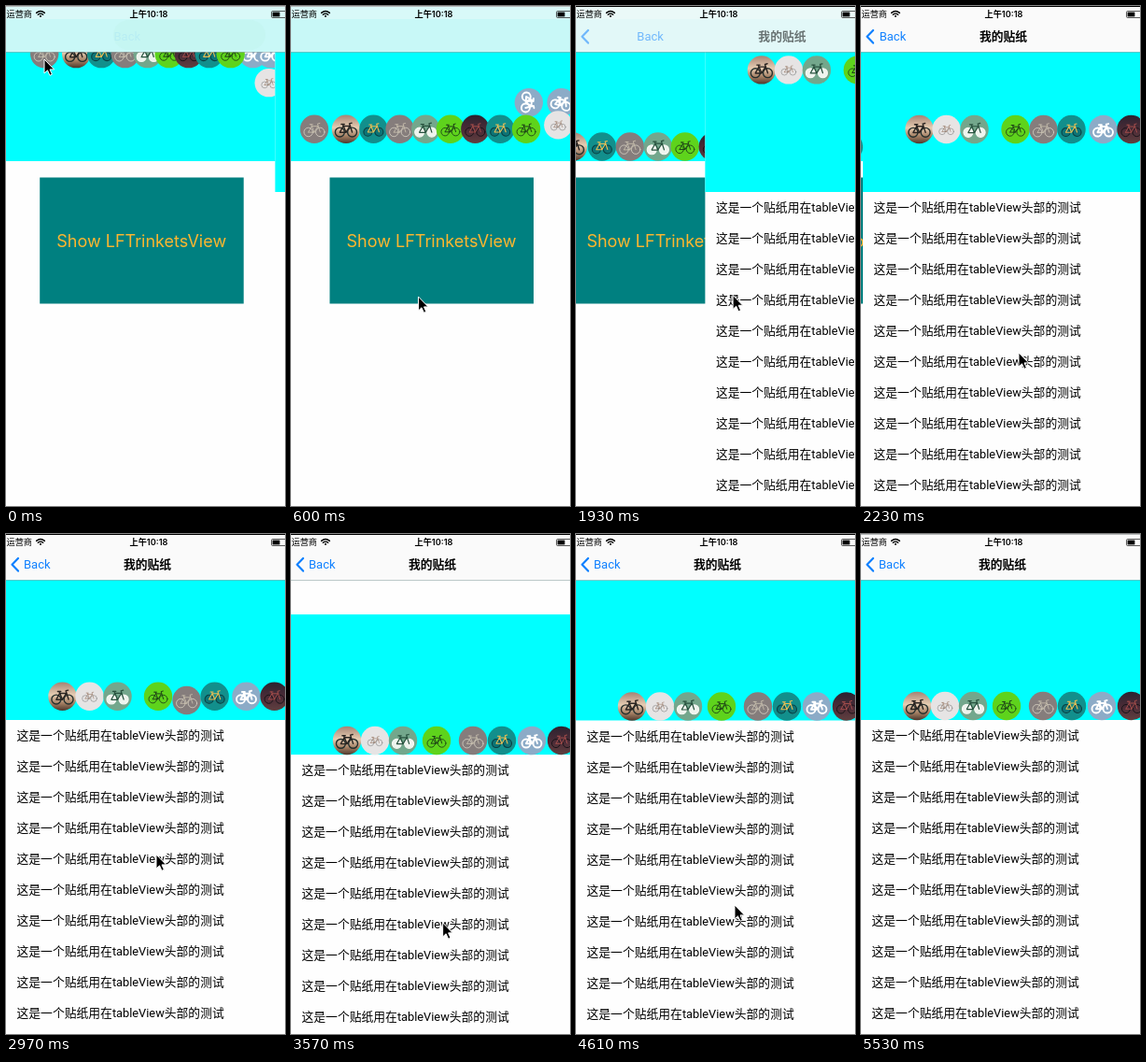
An HTML page that plays this animation: 299x535 px, repeating every 5.63 s.

```html
<!DOCTYPE html>
<html lang="zh-CN">
<head>
<meta charset="utf-8">
<title>我的贴纸</title>
<style>
  html, body { margin: 0; width: 100%; height: 100%; overflow: hidden; background: #fefefe; }
  svg { display: block; width: 100vw; height: 100vh; }
  text { font-family: Roboto, "Noto Sans CJK SC", "Noto Sans CJK", sans-serif; fill: #000; }
  .row { font-size: 12.8px; }
  .title { font-size: 12.8px; font-weight: 700; text-anchor: middle; }
  .back { font-size: 13px; fill: #0f80ff; }
  .show { font: 18px Inter, sans-serif; fill: #fdb62f; text-anchor: middle; }
  .carrier { font-size: 9.2px; }
  .clock { font: 600 9.2px Inter, "Noto Sans CJK SC", "Noto Sans CJK", sans-serif; text-anchor: middle; }
  .line { fill: none; stroke-linecap: round; stroke-linejoin: round; }
</style>
</head>
<body>
<svg viewBox="0 0 299 535" preserveAspectRatio="none">
  <defs>
    <linearGradient id="dusk" x2="0" y2="1">
      <stop offset="0" stop-color="#a58475"/><stop offset=".45" stop-color="#e6cdb2"/>
      <stop offset=".75" stop-color="#a17c60"/><stop offset="1" stop-color="#4b382d"/>
    </linearGradient>
    <linearGradient id="night" x2="0" y2="1">
      <stop offset="0" stop-color="#2b2330"/><stop offset=".55" stop-color="#4d2c37"/>
      <stop offset="1" stop-color="#5f4040"/>
    </linearGradient>
  </defs>
  <rect width="299" height="535" fill="#fefefe"/>

  <g id="home">
    <rect width="299" height="166" fill="#0ff"/>
    <g id="homeStickers"></g>
    <rect x="41.5" y="183.5" width="218.5" height="135" fill="#008080"/>
    <text class="show" x="150.5" y="257.5">Show LFTrinketsView</text>
  </g>

  <g id="list">
    <rect width="299" height="535" fill="#fefefe"/>
    <g id="table">
      <rect y="49" width="299" height="150" fill="#0ff"/>
      <g id="listStickers"></g>
      <g id="rows"></g>
    </g>
  </g>

  <rect width="299" height="49" fill="#d8f9f8"/>
  <rect y="14" width="299" height="35" fill="#c8f8f7"/>
  <rect id="glow" x="115" y="15" width="163" height="32" rx="16" fill="#bdf0e6"/>
  <rect id="plain" width="299" height="49" fill="#fafafa"/>
  <rect y="49" width="299" height=".6" fill="#8fa5a5"/>
  <path id="chevron" class="line" d="M13 26L6.5 32.8L13 39.6" stroke="#0f80ff" stroke-width="2.2"/>
  <text id="back" class="back" y="37.3">Back</text>
  <text id="title" class="title" y="37.3">我的贴纸</text>

  <text class="carrier" x=".5" y="12">运营商</text>
  <g class="line" stroke="#000" stroke-width="1.4">
    <path d="M32.6 7.4Q37 3.6 41.4 7.4M34.3 9.2Q37 7 39.7 9.2"/>
    <circle cx="37" cy="10.8" r=".4"/>
  </g>
  <text class="clock" x="153" y="12">上午10:18</text>
  <rect x="284.5" y="5.5" width="18" height="7" rx="1.2" fill="none" stroke="#333" stroke-width=".8"/>
  <rect x="285.6" y="6.6" width="7.8" height="4.8" fill="#000"/>
  <rect id="edge" width="299" height="1"/>
  <path id="cursor" d="M0 0V15L3.5 11.8L6 17.3L8.4 16.2L6 10.9H10.6Z" stroke="#fff" stroke-width="1"/>
</svg>
<script>
const LOOP = 5630, GRAVITY = 391, BOUNCE = .41;
const POP = -.43, PUSH = 1.64, PRESS = 3300, RELEASE = 4080, PRESS_Y = 343;
const $ = id => document.getElementById(id);
const clamp = v => Math.min(1, Math.max(0, v));
const ease = v => { v = clamp(v); return v * v * (3 - 2 * v); };
const mix = (a, b, v) => a + (b - a) * v;
const move = (el, x, y = 0, turn = 0) =>
  el.setAttribute('transform', `translate(${x.toFixed(2)} ${y.toFixed(2)}) rotate(${turn.toFixed(1)})`);

// fill, wheel colour, frame colour, line width, wheel fill, scale
const skins = {
  gray:  ['#857d7c', '#d5cfc2', '#c9c0ae', .8, 'none', 1.05],
  photo: ['url(#dusk)', '#24302e', '#2a2522', 1.3, 'none', 1.1],
  teal:  ['#128f8c', '#0a3f42', '#e6bd55', 1.1, '#0d7476', 1],
  sage:  ['#73a78c', '#f4f7f2', '#28523f', 1.1, '#eef4ee', 1.1],
  green: ['#5ed31c', '#204b18', '#1c3d17', 1, 'none', .95],
  dark:  ['url(#night)', '#191419', '#a14c4a', 1, 'none', 1],
  white: ['#e6e4e4', '#777', '#8d6a55', .7, 'none', .75],
  blue:  ['#8cabc7', '#fff', '#fff', 1.9, 'none', 1]
};

function sticker(parent, kind) {
  const [fill, wheel, frame, width, inside, size] = skins[kind];
  const g = document.createElementNS('http://www.w3.org/2000/svg', 'g');
  g.innerHTML = `<circle r="15.2" fill="${fill}"/>
    <g class="line" stroke-width="${width}" transform="scale(${size})">
      <g stroke="${wheel}" fill="${inside}"><circle cx="-6" cy="3" r="4.5"/><circle cx="6" cy="3" r="4.5"/></g>
      <path stroke="${frame}" d="M-6 3L-2.6 -3H3.8L0 3.2H-6M0 3.2L-3.2 -4.8M-4.6 -4.8H-1.6M6 3L3.3 -5.4L5.6 -6"/>
    </g>`;
  parent.append(g);
  return g;
}

// kind, first x, resting x, resting y, restitution, head start, final turn
const homeSet = [
  ['gray', 46.5, 11], ['photo', 80.5, 45], ['teal', 107.5, 76], ['gray', 133, 106],
  ['sage', 157, 136], ['green', 180, 165], ['dark', 201, 195], ['teal', 223, 225],
  ['blue', 270, 245, 121, BOUNCE, 0, 155], ['blue', 289, 290, 121, BOUNCE, 0, 20],
  ['green', 246, 256], ['white', 287, 286, 150, BOUNCE, .156]
];
const listSet = [
  ['photo', 60.5, 60], ['white', 89.5, 90], ['sage', 119.5, 120], ['green', 163.5, 156],
  ['gray', 193.5, 195, 184, .385], ['teal', 223.5, 226], ['blue', 257.5, 258], ['dark', 287.5, 290]
];
const build = (set, parent, floor) => set.map(
  ([kind, x0, x1, y = floor, bounce = BOUNCE, lead = 0, turn = 0]) =>
    ({ el: sticker(parent, kind), x0, x1, y, bounce, lead, turn }));
const homeStickers = build(homeSet, $('homeStickers'), 150.5);
const listStickers = build(listSet, $('listStickers'), 184);

$('rows').innerHTML = Array.from({ length: 11 }, (_, i) =>
  `<text class="row" x="11.5" y="${220.2 + 33 * i}">这是一个贴纸用在tableView头部的测试</text>`).join('');

// Height above the floor for a body dropped from h, with bounces
function height(s, h, bounce) {
  if (s < 0) return h;
  const fall = Math.sqrt(2 * h / GRAVITY);
  if (s < fall) return h - GRAVITY * s * s / 2;
  s -= fall;
  let v = GRAVITY * fall * bounce;
  for (let i = 0; i < 3; i++, v *= bounce) {
    const air = 2 * v / GRAVITY;
    if (s < air) return v * s - GRAVITY * s * s / 2;
    s -= air;
  }
  return 0;
}

function drop(set, s, top, slide) {
  for (const b of set)
    move(b.el, mix(b.x0, b.x1, slide), b.y - height(s + b.lead, b.y - top, b.bounce), b.turn * slide);
}

// Critically damped spring: share of the way still to go
const spring = x => x <= 0 ? 1 : (1 + x) * Math.exp(-x);

// Screen updates: [start, number of equal holds until the next start]
const holds = [[0, 1], [150, 6], [1050, 1], [1200, 1], [1350, 6], [2230, 1], [2370, 6],
  [3270, 1], [3420, 7], [4460, 1], [4610, 3], [5060, 1], [5530, 1], [LOOP, 1]];
function hold(t) {
  const i = holds.findIndex(h => h[0] > t) - 1;
  const [a, n] = holds[i], span = (holds[i + 1][0] - a) / n;
  return a + Math.floor((t - a) / span) * span;
}

const path = [[0, 41, 57], [250, 58, 110], [650, 140, 320], [900, 168, 370], [1150, 171, 364],
  [1350, 170, 337], [1560, 168, 300], [1660, 168, 300], [2230, 169, 371], [2970, 161, 343],
  [PRESS, 161, PRESS_Y], [4000, 166, 565], [4120, 167, 565], [4610, 170, 397], [5060, 172, 565], [LOOP, 172, 565]];
function pointer(t) {
  const i = path.findIndex(p => p[0] > t);
  const a = path[i - 1], b = path[i], v = ease((t - a[0]) / (b[0] - a[0]));
  return [mix(a[1], b[1], v), mix(a[2], b[2], v)];
}

function pull(t) {
  if (t < PRESS) return 0;
  const d = pointer(Math.min(t, RELEASE))[1] - PRESS_Y;
  const stretch = 486 * (1 - 1 / (d * .55 / 486 + 1));
  return stretch * spring((t - RELEASE) / 1000 * 14);
}

function draw(t) {
  const s = t / 1000, popping = t < 1400;
  const shown = popping ? spring(12 * (s - POP)) : 1 - spring(12 * (s - PUSH));
  const away = 1 - shown;

  move($('home'), -299 * shown * (popping ? .5 : .3) * 1);
  move($('list'), 299 * away);
  move($('table'), 0, pull(t));
  drop(homeStickers, s - POP, 15, ease(s / 1.05));
  drop(listStickers, s - PUSH, 64, ease((s - 2.9) / .45));

  $('plain').setAttribute('opacity', popping ? shown * .5 : shown);
  $('glow').setAttribute('opacity', popping ? clamp(shown * 16) * .6 : 0);
  $('chevron').setAttribute('opacity', popping ? 0 : shown);
  $('back').setAttribute('opacity', popping ? clamp(shown * 2) : shown);
  $('title').setAttribute('opacity', popping ? 0 : shown);
  move($('back'), 19 + 100 * away);
  move($('title'), 151.5 + 150 * away);
  $('edge').setAttribute('fill', t >= 1200 && t < 5530 ? '#000' : '#b8bcbc');
  move($('cursor'), ...pointer(t));
}

const start = performance.now();
function tick() {
  draw(hold((performance.now() - start) % LOOP));
  requestAnimationFrame(tick);
}
tick();
</script>
</body>
</html>
```
